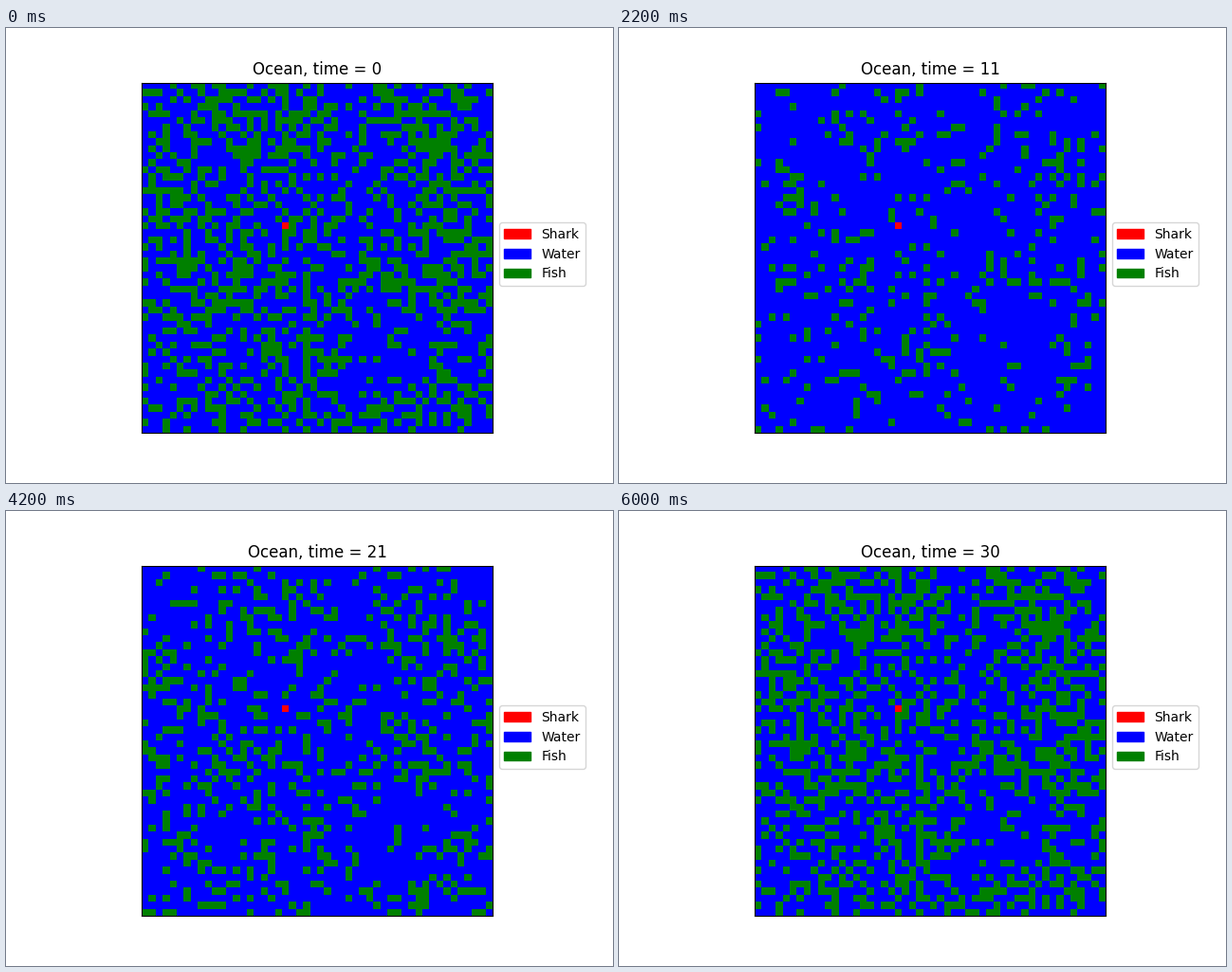
A matplotlib script that plays this animation: 640x480 px, repeating every 6.2 s.

```python
import random

import matplotlib.pyplot as plt
from matplotlib.animation import FuncAnimation
from matplotlib.colors import ListedColormap
from matplotlib.patches import Patch

SIZE = 50
STEPS = 31
START_FISH = 230
BREED_CHANCE = 0.051
SHARK = (20, 20)
WATER, FISH, PREDATOR = 0, 1, 2
COLORS = {"Shark": "red", "Water": "blue", "Fish": "green"}

rng = random.Random(5)


def seed_ocean():
    """Scatter the first fish evenly over the ocean."""
    cells = [(r, c) for r in range(SIZE) for c in range(SIZE) if (r, c) != SHARK]
    return set(rng.sample(cells, START_FISH))


def step(fish):
    """Move each fish to a free neighbour; a breeding one leaves a young behind."""
    taken = set(fish)
    order = sorted(fish)
    rng.shuffle(order)
    for r, c in order:
        around = [((r + dr) % SIZE, (c + dc) % SIZE)
                  for dr, dc in ((-1, 0), (1, 0), (0, -1), (0, 1))]
        free = [n for n in around if n not in taken and n != SHARK]
        if free:
            taken.add(rng.choice(free))
            if rng.random() >= BREED_CHANCE:
                taken.discard((r, c))
    return taken


def to_grid(fish):
    grid = [[WATER] * SIZE for _ in range(SIZE)]
    for r, c in fish:
        grid[r][c] = FISH
    grid[SHARK[0]][SHARK[1]] = PREDATOR
    return grid


def simulate():
    """States for every time; time 0 shows the same ocean as the last one."""
    fish = seed_ocean()
    grids = [to_grid(fish)]
    for _ in range(STEPS - 2):
        fish = step(fish)
        grids.append(to_grid(fish))
    return [grids[-1]] + grids


grids = simulate()

fig, ax = plt.subplots(figsize=(6.4, 4.8), dpi=100)
cmap = ListedColormap([COLORS["Water"], COLORS["Fish"], COLORS["Shark"]])
image = ax.imshow(grids[0], cmap=cmap, vmin=0, vmax=2, interpolation="nearest")
ax.set_xticks([])
ax.set_yticks([])
title = ax.set_title("Ocean, time = 0")
ax.legend(handles=[Patch(color=color, label=name) for name, color in COLORS.items()],
          loc="lower left", bbox_to_anchor=(1, 0.401))


def update(time):
    image.set_data(grids[time])
    title.set_text(f"Ocean, time = {time}")
    return image, title


anim = FuncAnimation(fig, update, frames=STEPS, interval=200,
                     repeat=True, repeat_delay=0, blit=False)
plt.show()
```
